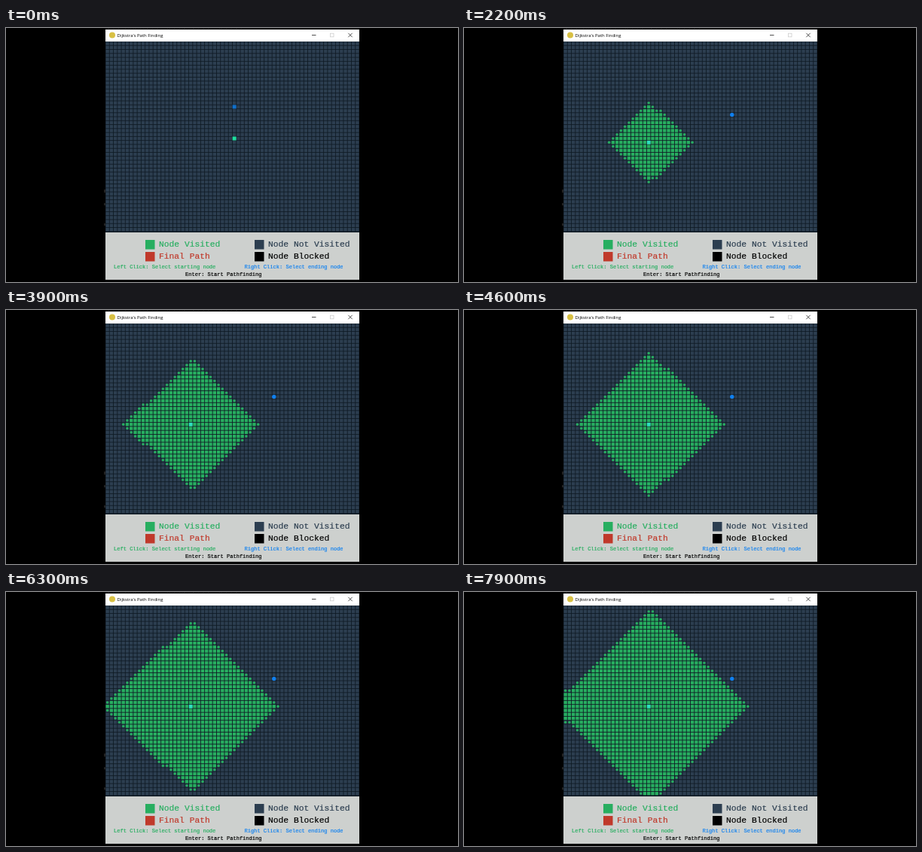
These frames come from a looping animation (600 by 338 pixels, 8000 ms). An HTML page with a canvas:

```html
<!DOCTYPE html>
<html lang="en">
<head>
<meta charset="utf-8">
<title>Path finding</title>
<style>
  html, body { margin: 0; width: 100%; height: 100%; overflow: hidden; background: #000; }
  canvas, svg { position: absolute; left: 0; top: 0; }
  .title { font: 5.95px "Open Sans", "Liberation Sans", sans-serif; }
  .mono { font-family: "Liberation Mono", "Courier New", monospace; white-space: pre; stroke-width: .2; }
  .big { font-size: 11.3px; }
  .small { font-size: 7.05px; }
  .green { fill: #27ae60; stroke: #27ae60; }
  .red { fill: #c0392b; stroke: #c0392b; }
  .navy { fill: #2c3e50; stroke: #2c3e50; }
  .blue { fill: #1080f0; stroke: #1080f0; }
  .black { fill: #000; stroke: #000; }
  rect { stroke: none !important; }
</style>
</head>
<body>
<canvas width="600" height="338"></canvas>
<svg width="600" height="338" viewBox="0 0 600 338">
  <!-- window behind -->
  <path d="M135 .3H154M158 .3H183M187 .3H206M213 .3H242M248 .3H272M282 .3H315" stroke="#484848" stroke-width=".7" stroke-dasharray="2 1.3"/>
  <path d="M131 215v4M131 233v3M131 260v3" stroke="#444" stroke-width="1"/>
  <!-- title bar -->
  <rect x="132" y="2" width="337" height="16" fill="#fff"/>
  <circle cx="141" cy="9.5" r="4" fill="#d8c044"/>
  <text class="title" x="147.6" y="11.8">Dijkstra's Path Finding</text>
  <path d="M406 9.5h5.5M454.3 6.8l5.4 5.4M459.7 6.8l-5.4 5.4" fill="none" stroke="#222" stroke-width=".8"/>
  <rect x="430" y="6.8" width="5.4" height="5.4" fill="#ccc"/>
  <rect x="430.8" y="7.6" width="3.8" height="3.8" fill="#fff"/>
  <!-- legend -->
  <rect x="132" y="272" width="337" height="63" fill="#cdd0ce"/>
  <rect class="green" x="185" y="282" width="12.5" height="12.5"/>
  <rect class="red" x="185" y="298" width="12.5" height="12.5"/>
  <rect class="navy" x="330" y="282" width="12.5" height="12.5"/>
  <rect class="black" x="330" y="298" width="12.5" height="12.5"/>
  <text class="mono big green" x="203" y="291">Node Visited</text>
  <text class="mono big red" x="203" y="307">Final Path</text>
  <text class="mono big navy" x="348" y="291">Node Not Visited</text>
  <text class="mono big black" x="348" y="307">Node Blocked</text>
  <text class="mono small green" x="143" y="320">Left Click: Select starting node</text>
  <text class="mono small blue" x="316.5" y="320">Right Click: Select ending node</text>
  <text class="mono small black" x="238" y="330">Enter: Start Pathfinding</text>
</svg>
<script>
const ctx = document.querySelector('canvas').getContext('2d');
const COLS = 64, ROWS = 48, PITCH = 337 / COLS, LEFT = 132, TOP = 18;
const LOOP = 8000, STEP = 100;
const HOME = [32, 24], START = [21, 25];
const GOAL_HOME = [32, 16], GOAL = [42, 18];
const START_CLICK = 300, GOAL_CLICK = 700;

// [time, number of nodes reached]; the search slows as it grows
const PROGRESS = [[0, 0], [1037, 0], [1500, 95], [3000, 403], [3900, 589],
  [5300, 839], [6300, 998], [7900, 1237]];

// Nodes in visiting order: ring by ring, right side first, then left, then the middle column
const sideKey = dx => dx > 0 ? -dx : dx < 0 ? 100 + dx : 200;
const nodes = [];
for (let row = 0; row < ROWS; row++)
  for (let col = 0; col < COLS; col++) {
    const dx = col - START[0], dy = row - START[1];
    nodes.push({ col, row, dx, dy, dist: Math.abs(dx) + Math.abs(dy) });
  }
nodes.sort((a, b) => a.dist - b.dist || sideKey(a.dx) - sideKey(b.dx) || b.dy - a.dy);
const rank = new Map(nodes.map((n, i) => [n.row * COLS + n.col, i]));

function reached(t) {
  const i = PROGRESS.findIndex(p => p[0] > t);
  const [[t0, n0], [t1, n1]] = i < 0 ? PROGRESS.slice(-2) : PROGRESS.slice(i - 1, i + 1);
  return Math.round(n0 + (n1 - n0) * (t - t0) / (t1 - t0));
}

function isOpen({ col, row }, count) {
  return [[1, 0], [-1, 0], [0, 1], [0, -1]].some(([x, y]) => {
    const c = col + x, r = row + y;
    return c >= 0 && c < COLS && r >= 0 && r < ROWS && rank.get(r * COLS + c) >= count;
  });
}

function cell(col, row, color, size = 4.4) {
  const gap = (PITCH - size) / 2;
  ctx.fillStyle = color;
  ctx.fillRect(LEFT + col * PITCH + gap, TOP + row * PITCH + gap, size, size);
}

function dot(col, row, color, radius) {
  ctx.fillStyle = color;
  ctx.beginPath();
  ctx.arc(LEFT + (col + .5) * PITCH, TOP + (row + .5) * PITCH, radius, 0, 7);
  ctx.fill();
}

function draw(t) {
  const count = reached(t);
  ctx.fillStyle = '#000';
  ctx.fillRect(0, 0, 600, 338);
  ctx.fillStyle = '#101b25';
  ctx.fillRect(LEFT, TOP, 337, 254);
  nodes.forEach((n, i) => {
    const open = i < count && isOpen(n, count);
    cell(n.col, n.row, i < count && !open ? '#27ae60' : '#2c3e50');
    if (open) dot(n.col, n.row, '#27ae60', 1.7);
  });
  if (t < START_CLICK) cell(...HOME, '#20e0a0', 5);
  else cell(...START, '#2ee0c0', 4.8);
  if (t < GOAL_CLICK) cell(...GOAL_HOME, '#1070cc', 5);
  else dot(...GOAL, '#1080f0', 2.7);
}

let last = -1;
function tick() {
  const t = Math.floor(performance.now() % LOOP / STEP) * STEP;
  if (t !== last) draw(last = t);
  requestAnimationFrame(tick);
}
tick();
</script>
</body>
</html>
```
